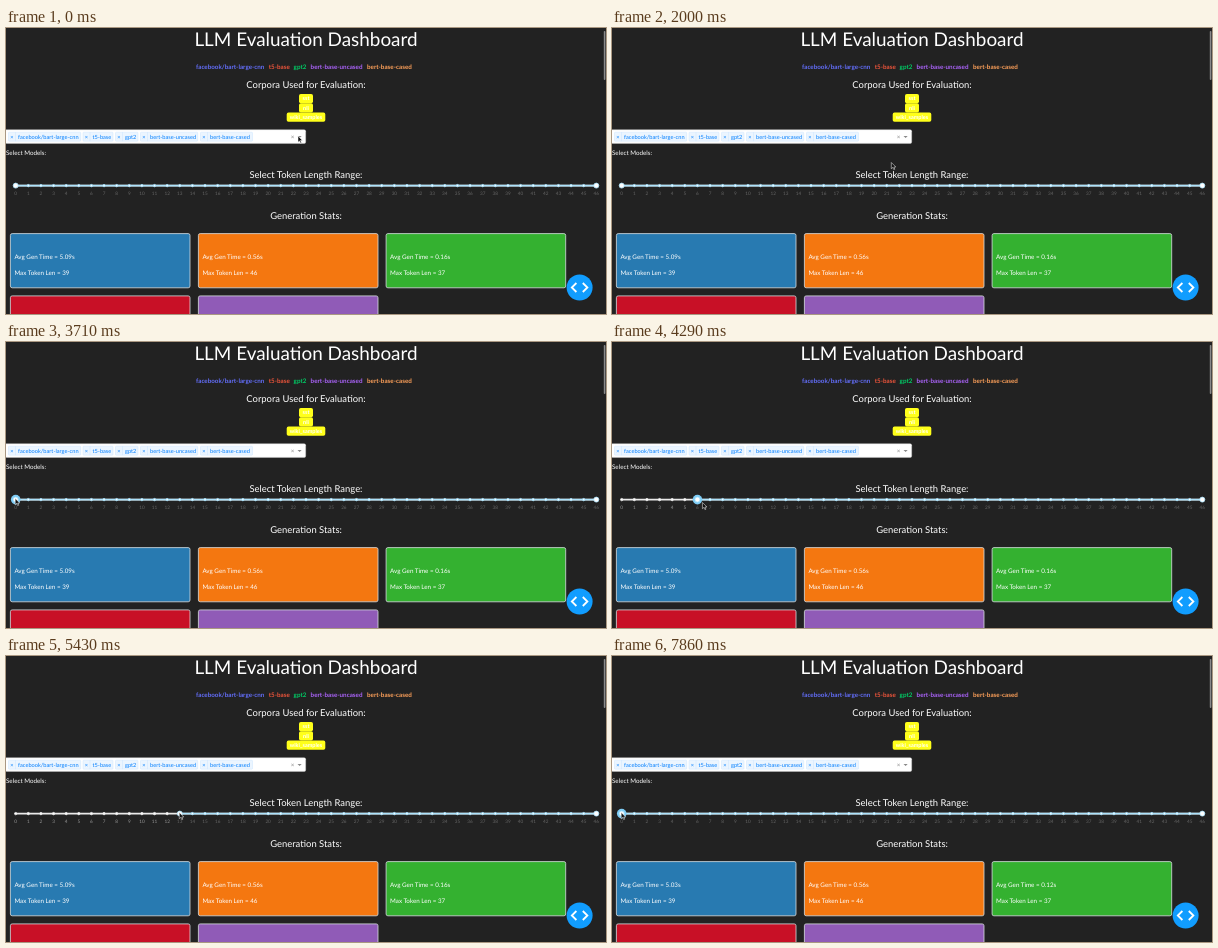
An HTML page for the animation above (8000 ms loop, 600 px wide and 286 px high).

```html
<!DOCTYPE html>
<html lang="en">
<head>
<meta charset="utf-8">
<title>LLM Evaluation Dashboard</title>
<style>
  html, body { margin: 0; width: 100%; height: 100%; overflow: hidden; background: #222; }
  svg { display: block; width: 600px; height: 286px; }
  text { font: 6.25px Lato, sans-serif; fill: #fff; text-rendering: geometricPrecision; white-space: pre; }
  .mid { text-anchor: middle; }
  .h1 { font-size: 18.9px; }
  .h4 { font-size: 9.45px; }
  .bold { font-weight: 700; }
  .badge { font-size: 5.5px; font-weight: 700; }
  .chip { font-size: 5.65px; fill: #007eff; }
  .mark { font-size: 4.7px; fill: #999; }
  .mark.on { fill: #666; }
  .dot { fill: #fff; stroke: #e9e9e9; stroke-width: .8; }
  .dot.on { stroke: #96dbfa; }
  .knob { fill: #fff; stroke: #abe2fb; stroke-width: .8; }
</style>
</head>
<body>
<svg id="stage" viewBox="0 0 600 286"></svg>
<script>
const stage = document.getElementById('stage');

function add(tag, attrs, content) {
  const el = document.createElementNS('http://www.w3.org/2000/svg', tag);
  for (const name in attrs) el.setAttribute(name, attrs[name]);
  if (content !== undefined) el.textContent = content;
  return stage.appendChild(el);
}
const rect = (x, y, width, height, fill, more) => add('rect', { x, y, width, height, fill, ...more });
const text = (x, y, content, cls = '', more) => add('text', { x, y, class: cls, ...more }, content);

// Headings
text(300, 18.2, 'LLM Evaluation Dashboard', 'mid h1');
text(300, 60.4, 'Corpora Used for Evaluation:', 'mid h4');
text(300, 150, 'Select Token Length Range:', 'mid h4');
text(300, 191, 'Generation Stats:', 'mid h4');
text(0, 126.6, 'Select Models:');

// Models: name, colour, legend x, chip left, chip right
const models = [
  ['facebook/bart-large-cnn', '#636efa', 190, 2.5, 74.7],
  ['t5-base', '#ef553b', 262.8, 77, 107],
  ['gpt2', '#00cc66', 287.6, 109.5, 132],
  ['bert-base-uncased', '#ab63fa', 304.6, 134.5, 191.7],
  ['bert-base-cased', '#ffa15a', 361, 194.5, 246.5]
];

rect(-1, 101.7, 300.7, 13.7, '#fff', { rx: 1.5, stroke: '#ccc', 'stroke-width': .4 });
for (const [name, color, x, left, right] of models) {
  text(x, 41.2, name, 'bold', { style: `fill:${color}` });
  rect(left, 104.2, right - left, 9, '#ebf5ff', { rx: .8, stroke: '#c2e0ff', 'stroke-width': .4 });
  add('path', { d: `M${left + 7} 104.2v9`, stroke: '#c2e0ff', 'stroke-width': .4 });
  text(left + 3.5, 110.5, '×', 'mid chip');
  text(left + 9.5, 110.6, name, 'chip');
}
text(286.5, 110.9, '×', 'mid', { style: 'fill:#888' });
add('path', { d: 'M291.5 107.9h4.2l-2.1 2.2z', fill: '#888' });
const caret = rect(248.2, 105, .6, 7.4, '#222');

// Corpora badges
[['sst', 66, 14], ['nli', 75.3, 14], ['wiki_samples', 84.6, 38.6]].forEach(([name, y, w]) => {
  rect(300 - w / 2, y, w, 9.2, '#ffff1a', { rx: 1.8 });
  text(300, y + 6.3, name, 'mid badge');
});

// Result cards
const cards = [
  [4, 205.2, '#287ab1'], [192, 205.2, '#f47710'], [379.7, 205.2, '#34b130'],
  [4, 267.5, '#c81026'], [192, 267.5, '#905bb7']
];
for (const [x, y, fill] of cards)
  rect(x + .4, y + .4, 179.6, 54.2, fill, { rx: 1.8, stroke: '#d8dde0', 'stroke-width': .8 });

const lengths = [39, 46, 37];
const averages = lengths.map((len, i) => {
  const x = cards[i][0] + 4.4;
  text(x, 246.8, `Max Token Len = ${len}`);
  return text(x, 231.3, '');
});

// Range slider
const MAX = 46, AXIS = 157.6;
const tickX = v => 9.7 + v * 580.6 / MAX;
rect(9.7, AXIS - .8, 580.6, 1.6, '#e9e9e9', { rx: .8 });
const track = rect(0, AXIS - .8, 0, 1.6, '#abe2fb');
const ticks = Array.from({ length: MAX + 1 }, (_, v) => [
  add('circle', { cx: tickX(v), cy: AXIS, r: 1.2 }),
  text(tickX(v), 167.3, v)
]);
const ring = add('circle', { cy: AXIS, r: 4.8, fill: '#7fcdf6' });
const low = add('circle', { cy: AXIS, r: 2.5, class: 'knob' });
add('circle', { cx: tickX(MAX), cy: AXIS, r: 2.5, class: 'knob' });

// Tools button and scrollbar
add('circle', { cx: 573.6, cy: 259.5, r: 13, fill: '#119dff' });
add('path', {
  d: 'M570.4 255l-4.6 4.5 4.6 4.5M576.8 255l4.6 4.5-4.6 4.5',
  fill: 'none', stroke: '#fff', 'stroke-width': 1.8
});
rect(597.8, 3, 1.6, 49, '#8a8a8a', { rx: .8 });

const pointer = add('path', {
  d: 'M0 0v6.2l1.5-1.3 1 2.2 1-.4-1-2.2h2z',
  fill: '#111', stroke: '#fff', 'stroke-width': .5
});

// Times below are counted in steps of 1/7 s
const caretOn = [[1, 6], [10, 14], [17, 21], [23, 25]];
const drags = [
  { from: 25, to: 38, values: [0, 1, 2, 4, 5, 6, 6, 7, 9, 12, 14, 13, 13] },
  { from: 51, to: 56, values: [4, 3, 2, 1, 0] }
];
const path = [[0, 292, 108], [13, 292, 108], [14, 279.3, 134.5], [19, 7.5, 158], [21, 8, 156.5], [25, 9, 156.5]];

function pointerAt(step, value) {
  if (step >= 25) {
    const lead = step > 25 && step < 35 ? 5 : -.5;
    return [tickX(value) + lead, lead > 0 ? 160.5 : 156.5];
  }
  const i = path.findIndex(p => p[0] > step);
  const end = path[i < 0 ? path.length - 1 : i], start = path[i < 0 ? path.length - 1 : i - 1];
  const k = end === start ? 0 : (step - start[0]) / (end[0] - start[0]);
  return [1, 2].map(n => start[n] + (end[n] - start[n]) * k);
}

function draw(step) {
  let value = step >= 38 ? 13 : 0;
  const drag = drags.find(d => step >= d.from && step < d.to);
  if (drag) value = drag.values[step - drag.from];

  const x = tickX(value);
  track.setAttribute('x', x);
  track.setAttribute('width', tickX(MAX) - x);
  low.setAttribute('cx', x);
  ring.setAttribute('cx', x);
  ring.setAttribute('visibility', drag ? 'visible' : 'hidden');
  ticks.forEach(([dot, label], v) => {
    const on = v >= value ? ' on' : '';
    dot.setAttribute('class', 'dot' + on);
    label.setAttribute('class', 'mid mark' + on);
  });

  const blink = caretOn.some(([a, b]) => step >= a && step < b);
  caret.setAttribute('visibility', blink ? 'visible' : 'hidden');
  pointer.setAttribute('transform', `translate(${pointerAt(step, value)})`);

  const times = step >= 44 ? ['5.03', '0.56', '0.12'] : ['5.09', '0.56', '0.16'];
  averages.forEach((el, i) => { el.textContent = `Avg Gen Time = ${times[i]}s`; });
}

let shown = -1;
function tick() {
  const step = Math.floor((performance.now() % 8000 + 2) * 7 / 1000) % 56;
  if (step !== shown) draw(shown = step);
  requestAnimationFrame(tick);
}
tick();
</script>
</body>
</html>
```
